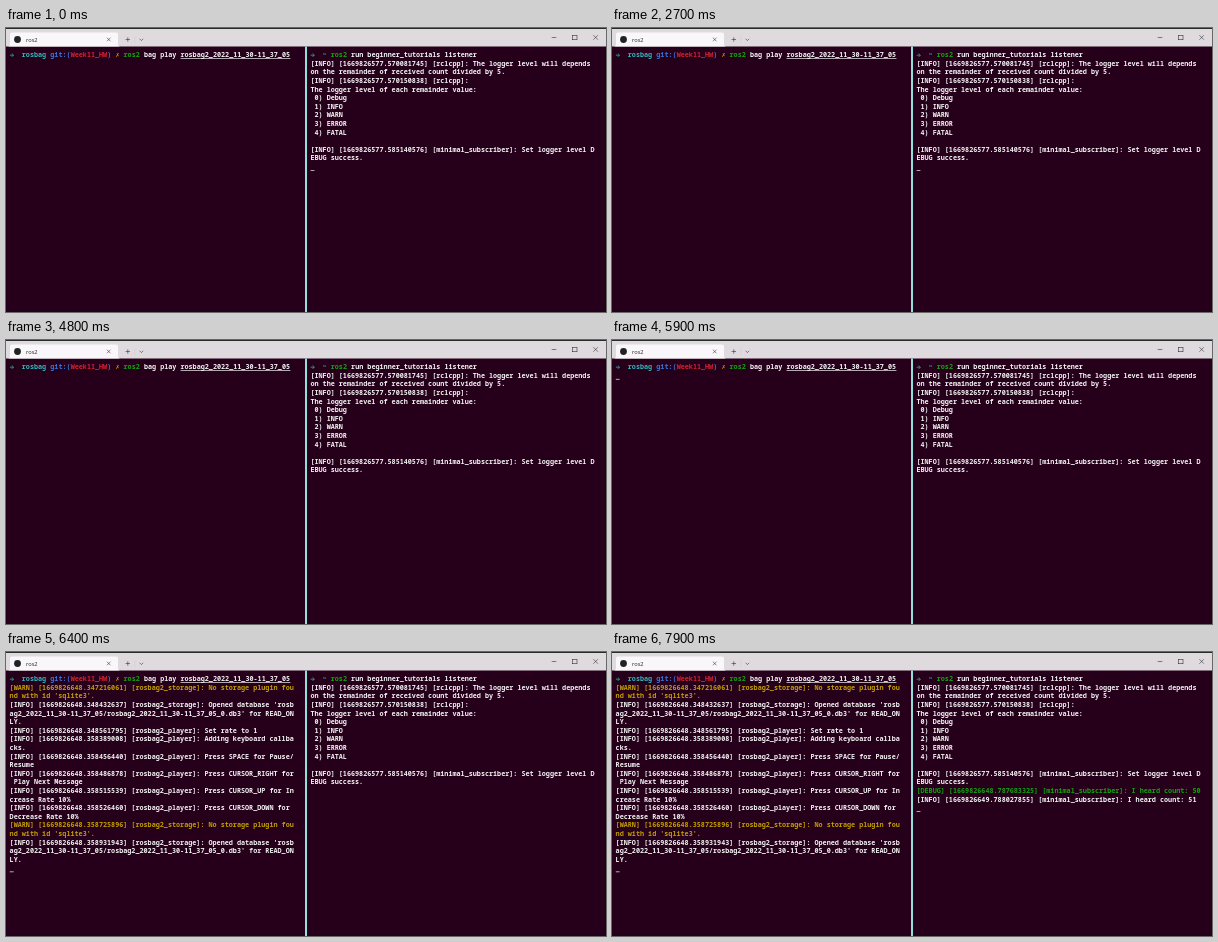
An HTML page that plays this animation: 600x284 px, repeating every 8 s.

```html
<!DOCTYPE html>
<html lang="en">
<head>
<meta charset="utf-8">
<title>Terminal with two panes</title>
<style>
  html, body { margin: 0; width: 100%; height: 100%; overflow: hidden; background: #26001b; }
  svg { display: block; width: 100vw; height: 100vh; }
  .term text {
    font: 600 6.78px "Noto Sans Mono", "DejaVu Sans Mono", monospace;
    font-variant-ligatures: none;
    white-space: pre;
  }
  .title { font: 5.7px "Open Sans", "Noto Sans", sans-serif; fill: #222; }
  .icon { fill: none; stroke: #333; stroke-width: .6; }
</style>
</head>
<body>
<svg viewBox="0 0 600 284" xmlns="http://www.w3.org/2000/svg">
  <rect width="600" height="284" fill="#26001b"/>
  <rect width="600" height="18.5" fill="#dfdade"/>
  <rect width="600" height="1" fill="#2b2b2b"/>
  <path d="M2 18.5 Q4 18.5 4 16.5 V6.5 Q4 4.5 6 4.5 H110 Q112 4.5 112 6.5 V16.5 Q112 18.5 114 18.5Z" fill="#faf7fa"/>
  <circle cx="11.5" cy="11.5" r="3.4" fill="#222"/>
  <text class="title" x="20" y="13.7">ros2</text>
  <g class="icon">
    <path d="M100.9 9.7l3.6 3.6m0-3.6l-3.6 3.6"/>
    <path d="M119.6 11.5h4.4m-2.2-2.2v4.4"/>
    <path d="M133.6 10.8l1.8 1.8 1.8-1.8"/>
    <path d="M545.7 9.5h4.6"/>
    <rect x="566.6" y="7.3" width="4.4" height="4.4"/>
    <path d="M587.4 7.2l4.5 4.5m0-4.5l-4.5 4.5"/>
  </g>
  <path d="M128.8 8v7" stroke="#ccc8cb" stroke-width=".5"/>
  <rect x="299" y="18.5" width="2" height="265.5" fill="#8fe0dc"/>
  <g id="term" class="term"></g>
</svg>
<script>
const LOOP = 8000, CELL = 4.07, ROW = 8.6, BASE = 29.2;
const LEFT = 3.6, RIGHT = 304.4;
const C = { white: '#f2f2f2', green: '#13a10e', yellow: '#c19c00', cyan: '#33b3b8',
            blue: '#3a74d8', red: '#d0202f', arrow: '#2aa184' };
const term = document.getElementById('term');
const timed = [];

function add(tag, attrs, text = '') {
  const el = document.createElementNS('http://www.w3.org/2000/svg', tag);
  for (const key in attrs) el.setAttribute(key, attrs[key]);
  el.textContent = text;
  return term.appendChild(el);
}

const write = (x, row, col, text, color) =>
  add('text', { x: x + col * CELL, y: BASE + row * ROW, fill: color }, text);

// Each part is [text, colour]; columns follow from the text lengths.
function prompt(x, parts) {
  add('path', { d: `M${x + .3} 27.2h3.6m-1.7-1.7l1.7 1.7-1.7 1.7`,
    fill: 'none', stroke: C.arrow, 'stroke-width': .9 });
  let col = 3;
  for (const [text, color] of parts) {
    write(x, 0, col, text, C[color]);
    col += text.length;
  }
}

function print(x, row, from, lines, color = 'white') {
  lines.forEach((line, i) => timed.push({ el: write(x, row + i, 0, line, C[color]), from }));
}

prompt(LEFT, [['rosbag ', 'cyan'], ['git:(', 'blue'], ['Week11_HW', 'red'],
  [') ', 'blue'], ['✗ ', 'yellow'], ['ros2 ', 'green'], ['bag play rosbag2_2022_11_30-11_37_05', 'white']]);
add('rect', { x: LEFT + 42 * CELL, y: 30.3, width: 27 * CELL, height: .7, fill: C.white });
prompt(RIGHT, [['~ ', 'cyan'], ['ros2 ', 'green'], ['run beginner_tutorials listener', 'white']]);

print(RIGHT, 1, 0, [
  '[INFO] [1669826577.570081745] [rclcpp]: The logger level will depends',
  'on the remainder of received count divided by 5.',
  '[INFO] [1669826577.570150838] [rclcpp]:',
  'The logger level of each remainder value:',
  ' 0) Debug', ' 1) INFO', ' 2) WARN', ' 3) ERROR', ' 4) FATAL', '',
  '[INFO] [1669826577.585140576] [minimal_subscriber]: Set logger level D',
  'EBUG success.'
]);
print(RIGHT, 13, 6600,
  ['[DEBUG] [1669826648.787683325] [minimal_subscriber]: I heard count: 50'], 'green');
print(RIGHT, 14, 7600,
  ['[INFO] [1669826649.788027855] [minimal_subscriber]: I heard count: 51']);

const warning = stamp => [
  `[WARN] [1669826648.${stamp}] [rosbag2_storage]: No storage plugin fou`,
  "nd with id 'sqlite3'."
];
const opened = stamp => [
  `[INFO] [1669826648.${stamp}] [rosbag2_storage]: Opened database 'rosb`,
  "ag2_2022_11_30-11_37_05/rosbag2_2022_11_30-11_37_05_0.db3' for READ_ON",
  'LY.'
];
const player = (stamp, text) => `[INFO] [1669826648.${stamp}] [rosbag2_player]: ${text}`;

print(LEFT, 1, 6200, warning('347216061'), 'yellow');
print(LEFT, 3, 6200, [...opened('348432637'), player('348561795', 'Set rate to 1')]);
print(LEFT, 7, 6400, [
  player('358389008', 'Adding keyboard callba'), 'cks.',
  player('358456440', 'Press SPACE for Pause/'), 'Resume',
  player('358486878', 'Press CURSOR_RIGHT for'), ' Play Next Message',
  player('358515539', 'Press CURSOR_UP for In'), 'crease Rate 10%',
  player('358526460', 'Press CURSOR_DOWN for '), 'Decrease Rate 10%'
]);
print(LEFT, 17, 6400, warning('358725896'), 'yellow');
print(LEFT, 19, 6400, opened('358931943'));

const cursor = x => add('rect', { x: x + .2, width: 3.8, height: .7, fill: C.white });
const leftCursor = cursor(LEFT), rightCursor = cursor(RIGHT);

function place(el, row, on) {
  el.setAttribute('y', BASE + row * ROW + 1.1);
  el.setAttribute('visibility', on ? 'visible' : 'hidden');
}

// The right cursor blinks until focus moves to the left pane.
function rightOn(t) {
  if (t >= 3900) return t >= 6600;
  return t < 1000 || (t - 1000) % 1100 >= 500;
}

function draw(t) {
  for (const { el, from } of timed) el.setAttribute('visibility', t >= from ? 'visible' : 'hidden');
  place(leftCursor, t < 6200 ? 1 : t < 6400 ? 7 : 22, t >= 5700);
  place(rightCursor, t < 6600 ? 13 : t < 7600 ? 14 : 15, rightOn(t));
}

function tick() {
  draw(performance.now() % LOOP);
  requestAnimationFrame(tick);
}
tick();
</script>
</body>
</html>
```
